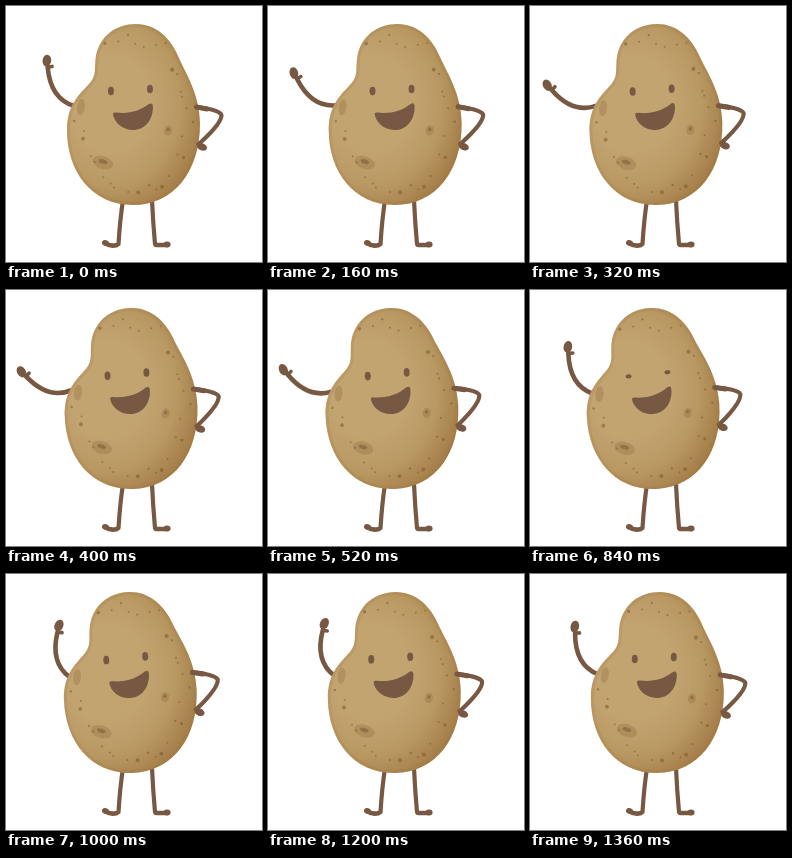
These frames come from a looping animation (256x256 px, 1400 ms). An HTML page with a canvas:

```html
<!DOCTYPE html>
<html lang="en">
<head>
<meta charset="utf-8">
<title>Waving potato</title>
<style>
html, body { margin: 0; width: 100%; height: 100%; overflow: hidden; background: #fff; }
canvas { display: block; width: 256px; height: 256px; }
</style>
</head>
<body>
<canvas id="stage" width="256" height="256"></canvas>
<script>
const ctx = document.getElementById('stage').getContext('2d');
const PERIOD = 1400, STEP = 40;
const BROWN = '#775843';
const DEG = Math.PI / 180;
const BASE = [127, 199], SHOULDER = [66, 99.5];

const skin = new Path2D(
  'M130 18 C150 18 165 32 173 52 C179 66 194 88 194 118 ' +
  'C194 165 168 199 127 199 C86 199 61 166 61 124 ' +
  'C61 98 74 88 84 77 C91 69 88 62 90 50 C94 30 110 18 130 18 Z');

const mouth = new Path2D(
  'M107 108 Q107 106 110 106.5 C123 108 134 105 143 98 ' +
  'Q147 96 147 101 C147 115 138 124 127 124 C116 124 108 116 107 108 Z');

const wave = (t, peak) => Math.cos(2 * Math.PI * (t - peak) / PERIOD);

function seededRandom(seed) {
  return () => (seed = seed * 16807 % 2147483647) / 2147483647;
}

function ellipse(x, y, rx, ry, angle = 0) {
  ctx.beginPath();
  ctx.ellipse(x, y, rx, ry, angle * DEG, 0, 2 * Math.PI);
  ctx.fill();
}

function stroke(path, width) {
  ctx.lineWidth = width;
  ctx.stroke(new Path2D(path));
}

function rotateAbout([x, y], angle) {
  ctx.translate(x, y);
  ctx.rotate(angle * DEG);
  ctx.translate(-x, -y);
}

function drawLegs() {
  stroke('M117 194 Q114 214 112.5 238', 4.2);
  stroke('M111 239 Q104 241 99 237', 4.6);
  stroke('M146 194 Q147 216 149 238', 4.2);
  stroke('M150 239 H161', 4.6);
  ellipse(161, 238.5, 3.6, 3);
  ellipse(99.5, 237, 3.6, 2.8, 20);
}

function drawWavingArm(angle) {
  ctx.save();
  rotateAbout(SHOULDER, angle);
  stroke('M68 100 C54 95 44.5 83 43.5 60', 4.6);
  ellipse(43, 53.5, 4.3, 6, 10);
  stroke('M44 60 L48 59.5', 3.6);
  ctx.restore();
}

function drawHipArm() {
  stroke('M191 101 C201 102 214 105 215.5 109 C216 116 204 128 194 137', 4.2);
  stroke('M190.5 101 L201 103', 5);
  ellipse(196, 141, 5.2, 3.6, 20);
  stroke('M192 138 L194 137', 3.4);
}

function drawSkin() {
  ctx.save();
  ctx.clip(skin);
  ctx.save();
  ctx.translate(105, 98);
  ctx.scale(1, 1.2);
  const shade = ctx.createRadialGradient(0, 0, 40, 0, 0, 98);
  shade.addColorStop(0, '#c2a471');
  shade.addColorStop(0.5, '#b99862');
  shade.addColorStop(1, '#a17a44');
  ctx.fillStyle = shade;
  ctx.fillRect(-105, -90, 256, 220);
  ctx.restore();
  ctx.strokeStyle = 'rgba(160,120,65,.22)';
  ctx.lineWidth = 6;
  ctx.stroke(skin);
  drawDots();
  ctx.restore();
}

// Specks follow the rim, leaving the upper left clear
function drawDots() {
  const random = seededRandom(29), count = 30;
  ctx.fillStyle = 'rgba(125,88,46,.55)';
  for (let i = 0; i < count; i++) {
    const angle = (-120 + 305 * (i + random()) / count) * DEG;
    const reach = 0.76 + 0.18 * random();
    const radius = 1 + 1.2 * random() ** 6;
    ellipse(128 + 64 * reach * Math.cos(angle), 108 + 90 * reach * Math.sin(angle), radius, radius);
  }
}

function drawPatch(x, y, rx, ry, angle, core) {
  ctx.fillStyle = 'rgba(133,96,50,.27)';
  ellipse(x, y, rx, ry, angle);
  ctx.fillStyle = 'rgba(115,78,42,.45)';
  ellipse(x, y - 1, rx * core, ry * core * 0.8, angle);
}

function drawFace(t) {
  const closed = Math.max(0, 1 - Math.abs(t - 840) / 120);
  const height = 4.3 - 2.2 * closed;
  ellipse(105, 85, 3, height);
  ellipse(144, 83, 3, height);
  ctx.fill(mouth);
}

function draw(t) {
  const lean = -1.7 * (1 - wave(t, 40));
  const swing = -10.5 - 30.5 * wave(t, 408);
  ctx.fillStyle = '#fff';
  ctx.fillRect(0, 0, 256, 256);
  ctx.fillStyle = ctx.strokeStyle = BROWN;
  ctx.lineCap = ctx.lineJoin = 'round';
  drawLegs();
  ctx.save();
  rotateAbout(BASE, lean);
  drawWavingArm(swing - lean);
  drawSkin();
  drawPatch(75, 101, 4, 8, 8, 0);
  drawPatch(97, 156.5, 10.5, 6.3, 18, 0.42);
  drawPatch(162, 124.5, 4, 5.2, 15, 0.42);
  ctx.fillStyle = BROWN;
  drawFace(t);
  drawHipArm();
  ctx.restore();
}

const start = performance.now();
function tick() {
  const t = (performance.now() - start) % PERIOD;
  draw(Math.floor(t / STEP) * STEP);
  requestAnimationFrame(tick);
}
tick();
</script>
</body>
</html>
```
